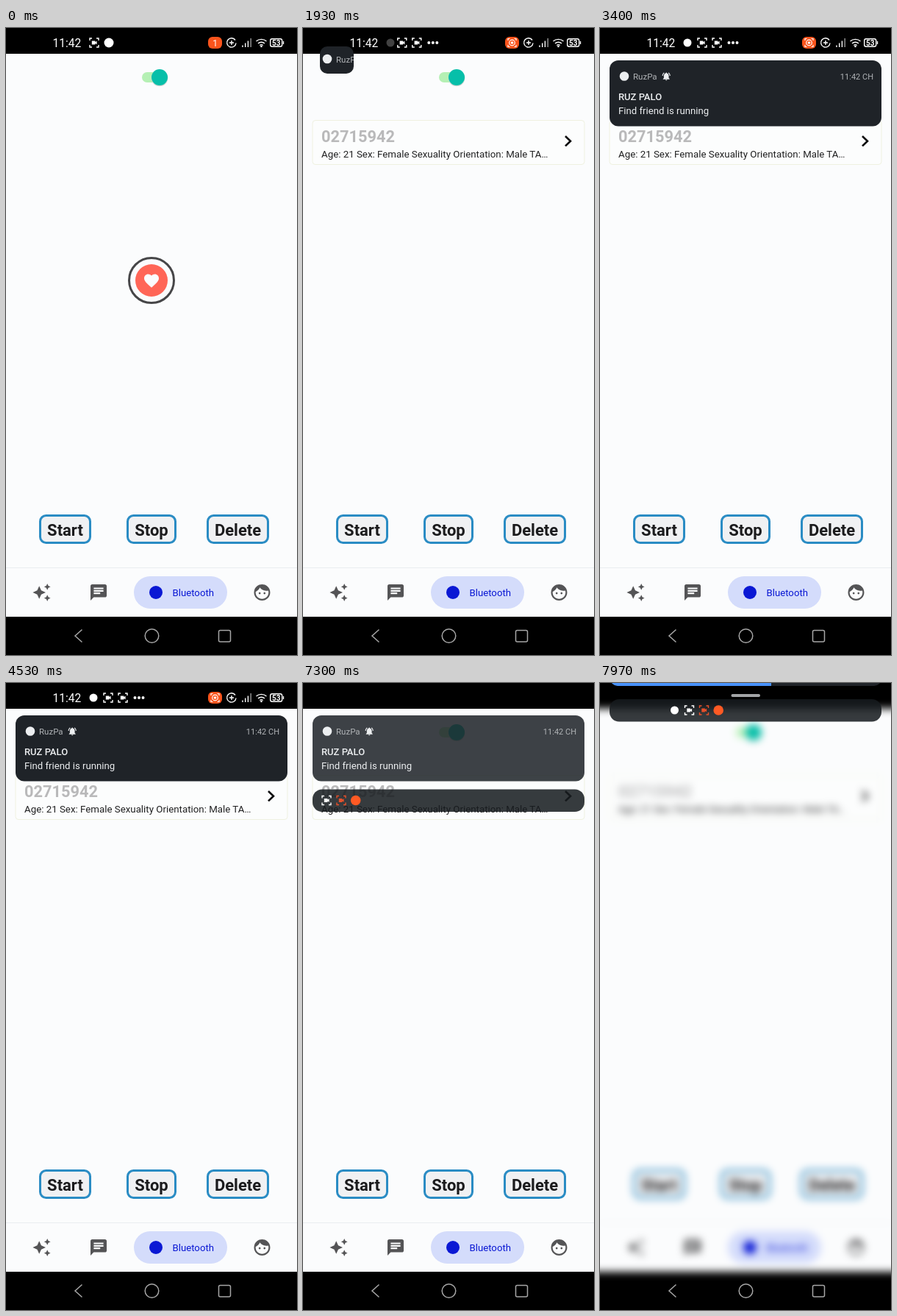
An HTML page that plays this animation: 396 px wide and 852 px high, repeating every 8 s.

```html
<!DOCTYPE html>
<html lang="en">
<head>
<meta charset="utf-8">
<title>Find friend</title>
<style>
html, body { margin: 0; width: 100%; height: 100%; overflow: hidden; background: #000; }
svg { display: block; width: 396px; height: 852px; font-family: Roboto, sans-serif; }
</style>
</head>
<body>
<svg viewBox="0 0 396 852" xmlns="http://www.w3.org/2000/svg">
  <defs>
    <filter id="soft" filterUnits="userSpaceOnUse" x="-20" y="-20" width="436" height="892" color-interpolation-filters="sRGB">
      <feGaussianBlur id="blur" stdDeviation="0"/>
    </filter>
    <clipPath id="noteClip"><rect id="noteHole"/></clipPath>
    <g id="cap" fill="none" stroke="currentColor" stroke-width="1.4">
      <path d="M-6 -3V-6H-3M3 -6H6V-3M6 3V6H3M-3 6H-6V3"/>
      <path d="M-3.2 -2.5H1.4V-1L3.6 -2.2V2.2L1.4 1V2.5H-3.2Z" fill="currentColor" stroke="none"/>
    </g>
    <g id="sun" fill="#fff" stroke="#fff" stroke-width="2" stroke-linecap="round">
      <circle r="6" stroke="none"/>
      <path id="rays"/>
    </g>
  </defs>

  <g id="page">
    <rect x="-30" y="-30" width="456" height="912"/>
    <rect x="-30" y="35" width="456" height="765" fill="#fbfcfd"/>
    <rect x="185" y="60" width="30" height="14" rx="7" fill="#b5f0b4"/>
    <circle cx="209" cy="68" r="11.3" fill="#d0d6d2"/>
    <circle cx="209" cy="67" r="11" fill="#06bfa9"/>

    <g id="loader">
      <circle id="ring" cx="198" cy="343" fill="none" stroke="#464648" stroke-width="3"/>
      <circle cx="198" cy="343" r="22" fill="#ff6657"/>
      <path transform="translate(186 331.5)" fill="#fbfcfd" d="M12 21.35l-1.45-1.32C5.4 15.36 2 12.28 2 8.5 2 5.42 4.42 3 7.5 3c1.74 0 3.41.81 4.5 2.09C13.09 3.81 14.76 3 16.5 3 19.58 3 22 5.42 22 8.5c0 3.78-3.4 6.86-8.55 11.54L12 21.35z"/>
    </g>

    <g id="card">
      <rect x="13" y="125.500" width="370" height="60" rx="4" fill="#fcfdfd" stroke="#eff1e0"/>
      <text x="25" y="155" font-size="21.8" font-weight="700" fill="#b9b9ba">02715942</text>
      <text x="25" y="175.500" font-size="13.3" fill="#212122">Age: 21 Sex: Female Sexuality Orientation: Male TA…</text>
      <path d="M357 147l7 6.700-7 6.700" fill="none" stroke="#0c0c0d" stroke-width="2.600"/>
    </g>

    <g id="buttons"></g>

    <path d="M0 733.500H396" stroke="#e9edf0"/>
    <rect x="174" y="745" width="127" height="44" rx="22" fill="#d4dcfb"/>
    <circle cx="204" cy="767" r="9" fill="#0a18d4"/>
    <text x="226.500" y="772" font-size="13.2" fill="#0a18d4">Bluetooth</text>
    <g fill="#545456">
      <path transform="translate(35.3 753.8) scale(1.1)" d="M19 9l1.25-2.75L23 5l-2.75-1.25L19 1l-1.25 2.75L15 5l2.75 1.25L19 9zm-7.5.5L9 4 6.5 9.5 1 12l5.5 2.5L9 20l2.5-5.5L17 12l-5.5-2.5zM19 15l-1.25 2.75L15 19l2.75 1.25L19 23l1.25-2.75L23 19l-2.75-1.25L19 15z"/>
      <path transform="translate(112.8 753.8) scale(1.1)" d="M20 2H4c-1.1 0-1.99.9-1.99 2L2 22l4-4h14c1.1 0 2-.9 2-2V4c0-1.1-.9-2-2-2zM6 9h12v2H6V9zm8 5H6v-2h8v2zm4-6H6V6h12v2z"/>
      <path transform="translate(335.3 753.8) scale(1.1)" d="M9 11.75c-.69 0-1.25.56-1.25 1.25s.56 1.25 1.25 1.25 1.25-.56 1.25-1.25-.56-1.25-1.25-1.25zm6 0c-.69 0-1.25.56-1.25 1.25s.56 1.25 1.25 1.25 1.25-.56 1.25-1.25-.56-1.25-1.25-1.25zM12 2C6.48 2 2 6.48 2 12s4.48 10 10 10 10-4.48 10-10S17.52 2 12 2zm0 18c-4.41 0-8-3.59-8-8 0-.29.02-.58.05-.86 2.36-1.05 4.23-2.98 5.21-5.37C11.07 8.33 14.05 10 17.42 10c.78 0 1.53-.09 2.25-.26.21.71.33 1.47.33 2.26 0 4.41-3.59 8-8 8z"/>
    </g>
  </g>

  <g fill="none" stroke="#a6a6a6" stroke-width="1.5">
    <path d="M103.500 817.500L94 826l9.500 8.500"/>
    <circle cx="198.500" cy="826" r="9.300"/>
    <rect x="289.500" y="818.500" width="16" height="15.500" rx="2"/>
  </g>

  <g id="status" fill="#fff" color="#fff">
    <text x="63.500" y="26" font-size="15.6">11:42</text>
    <g id="before">
      <use href="#cap" x="120" y="20"/>
      <circle cx="140" cy="20" r="6.500"/>
    </g>
    <g id="after">
      <circle id="appDot" cx="119" cy="20" r="5.500"/>
      <g id="tray">
        <use href="#cap" x="139" y="20"/>
        <use href="#cap" x="159" y="20"/>
        <circle cx="175.500" cy="20" r="2"/><circle cx="181" cy="20" r="2"/><circle cx="186.500" cy="20" r="2"/>
      </g>
    </g>
    <rect x="275" y="12" width="19" height="16" rx="6" fill="#f9541c"/>
    <text id="count" x="284.500" y="24.500" font-size="12" text-anchor="middle">1</text>
    <g id="rec" fill="none" stroke="#fff" stroke-width="1.200">
      <circle cx="284.500" cy="20" r="3.800"/>
      <circle cx="284.500" cy="20" r="1.800" fill="#fff" stroke="none"/>
      <path d="M279 17V14.500H281.500M287.500 14.500H290V17M290 23V25.500H287.500M281.500 25.500H279V23"/>
    </g>
    <g fill="none" stroke="#fff" stroke-width="1.400">
      <path d="M312 16.500A6.200 6.200 0 1 0 313 20.500M307 17V23M304 20H310"/>
      <path d="M322 26V23.500M325.700 26V20.500M329.400 26V17.500"/>
      <path d="M333.200 26V14" opacity=".6"/>
      <path d="M340.500 18A10.500 10.500 0 0 1 354.500 18M343 21A6.800 6.800 0 0 1 352 21M345.300 23.500A3.500 3.500 0 0 1 349.700 23.500"/>
      <rect x="359.700" y="14.700" width="16" height="10.600" rx="2.500"/>
      <path d="M377.500 18V22"/>
    </g>
    <circle cx="347.500" cy="25" r="1.300"/>
    <text x="367.700" y="23.700" font-size="10" font-weight="700" text-anchor="middle">53</text>
  </g>

  <g id="note">
    <rect id="noteBox" fill="#1f2328"/>
    <g clip-path="url(#noteClip)">
      <g id="noteText" fill="#eceef0">
        <circle cx="33" cy="65.500" r="6.300"/>
        <text x="45" y="70" font-size="11.5" fill="#b0b3b6">RuzPa</text>
        <path transform="translate(83.500 59) scale(.56)" d="M7.580 4.080L6.150 2.650C3.750 4.480 2.170 7.300 2.030 10.500h2c.15-2.650 1.510-4.970 3.550-6.420zm12.390 6.420h2c-.15-3.200-1.730-6.020-4.120-7.850l-1.420 1.430c2.020 1.450 3.390 3.770 3.540 6.420zM18 11c0-3.070-1.640-5.640-4.500-6.320V4c0-.83-.67-1.500-1.500-1.500s-1.500.67-1.500 1.500v.68C7.630 5.360 6 7.920 6 11v5l-2 2v1h16v-1l-2-2v-5zm-6 11c1.100 0 2-.9 2-2h-4c0 1.100.9 2 2 2z"/>
        <text x="372" y="70" font-size="11" text-anchor="end" fill="#b0b3b6">11:42 CH</text>
        <text x="25" y="98" font-size="13" font-weight="500">RUZ PALO</text>
        <text x="25" y="117" font-size="13.2">Find friend is running</text>
      </g>
    </g>
  </g>

  <g id="slider">
    <path d="M14 -60H383V-10A10 10 0 0 1 373 0H24A10 10 0 0 1 14 -10Z" fill="#1f2328"/>
    <path d="M14 -60H233V0H24A10 10 0 0 1 14 -10Z" fill="#4791fa"/>
    <use href="#sun" x="38" y="-24"/>
    <use href="#sun" x="359" y="-24"/>
    <rect id="grip" x="178.500" y="11" width="39.500" height="4" rx="2" fill="#a2a4a6"/>
  </g>

  <g id="bar">
    <rect x="13" y="0" width="370" height="30.500" rx="13" fill="#171b1f" fill-opacity=".86"/>
    <g id="icons">
      <circle id="barApp" cx="-20" cy="15" r="5.500" fill="#fff"/>
      <use href="#cap" y="15" color="#fff"/>
      <use href="#cap" x="20" y="15" color="#e8502a"/>
      <circle cx="39.700" cy="15" r="6.800" fill="#ff5a24"/>
    </g>
  </g>
</svg>
<script>
const LOOP = 8000;
const $ = id => document.getElementById(id);
const set = (id, attrs) => { for (const k in attrs) $(id).setAttribute(k, attrs[k]); };
const show = (id, on) => set(id, { opacity: +on });
const move = (id, x, y) => set(id, { transform: `translate(${x} ${y})` });
const mix = (a, b, p) => a + (b - a) * p;
const span = (t, a, b) => Math.min(1, Math.max(0, (t - a) / (b - a)));
const ease = p => p * p * (3 - 2 * p);
const out = p => 1 - (1 - p) ** 3;

$('buttons').innerHTML = [['Start', 45, 71], ['Stop', 164, 68], ['Delete', 273, 85]].map(([name, x, w]) =>
  `<rect x="${x + 1.5}" y="662.5" width="${w - 3}" height="37" rx="8" fill="#f0f1f3" stroke="#2a8cc4" stroke-width="3"/>
   <text x="${x + w / 2}" y="690" font-size="22" font-weight="700" text-anchor="middle" fill="#1b1b1d">${name}</text>`).join('');

set('rays', { d: Array.from({ length: 8 }, (_, i) => {
  const c = Math.cos(i * Math.PI / 4), s = Math.sin(i * Math.PI / 4);
  return `M${9.3 * c} ${9.3 * s}L${11 * c} ${11 * s}`;
}).join('') });

function drawNote(t) {
  const pop = out(span(t, 1850, 1930)), grow = ease(span(t, 1930, 2230));
  const leave = ease(span(t, 7310, 7480));
  const box = {
    x: mix(mix(40, 23, pop), 13, grow),
    y: mix(mix(8, 25, pop), 44, grow),
    width: mix(mix(12, 46, pop), 370, grow),
    height: mix(mix(12, 37, pop), 89.5, grow),
    rx: mix(10, 12, grow)
  };
  set('noteBox', { ...box, 'fill-opacity': mix(1, .86, ease(span(t, 7050, 7280))) });
  set('noteHole', box);
  move('noteText', 0, mix(-23.5, 0, grow));
  move('note', 0, -70 * leave);
  set('note', { opacity: t < 1850 ? 0 : 1 - leave });
}

function drawShade(t) {
  const fold = ease(span(t, 7300, 7570)), lift = span(t, 7570, 7970);
  set('bar', { opacity: ease(span(t, 7080, 7260)) });
  move('bar', 0, mix(mix(mix(125, 144.5, out(span(t, 7080, 7290))), 54.5, fold), 22, lift));
  move('icons', mix(mix(32, 92, fold), 121.5, lift), 0);
  set('barApp', { opacity: span(t, 7400, 7540) });
  move('slider', 0, mix(mix(-20, 37, fold), 4, lift));
  show('slider', t > 7300);
  set('grip', { opacity: span(t, 7620, 7900) });
  set('blur', { stdDeviation: 5.5 * fold });
  if (fold > 0) $('page').setAttribute('filter', 'url(#soft)');
  else $('page').removeAttribute('filter');
}

function draw(t) {
  const found = t >= 500, recording = t >= 400;
  show('loader', !found);
  show('card', found);
  set('ring', { r: mix(30.5, 39, span(t, 30, 500)), opacity: 1 - .8 * span(t, 30, 500) });

  show('count', !recording);
  show('rec', recording);
  show('before', !recording);
  show('after', recording);
  const push = ease(span(t, 1840, 1970));
  move('tray', mix(-19.5, 0, push), 0);
  set('appDot', { opacity: span(t, 1890, 2050) });
  set('status', { opacity: 1 - span(t, 7080, 7230) });

  drawNote(t);
  drawShade(t);
}

function tick() {
  draw(performance.now() % LOOP);
  requestAnimationFrame(tick);
}
tick();
</script>
</body>
</html>
```
